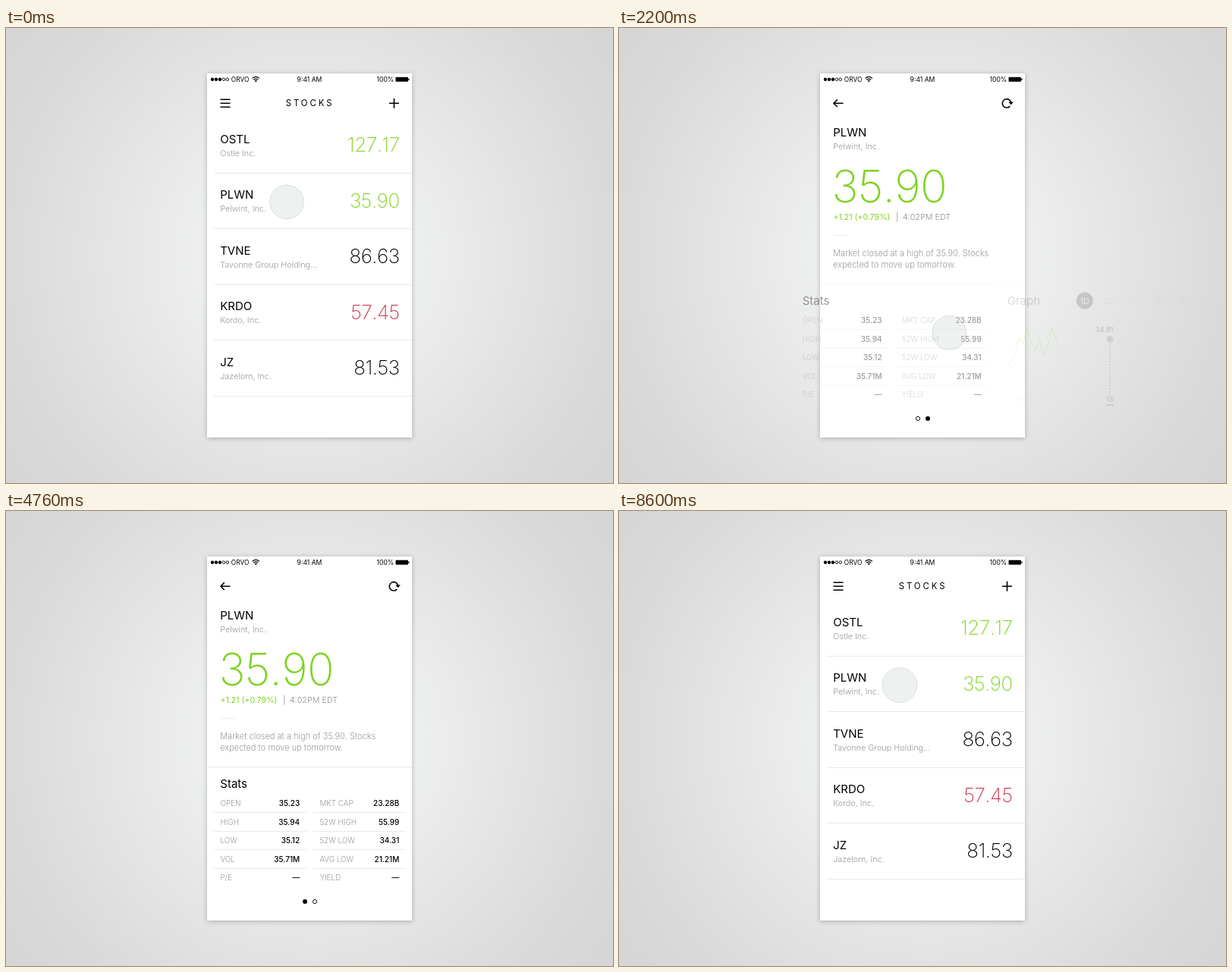
These frames come from a looping animation (800 px wide and 600 px high, 8640 ms). An HTML page:

```html
<!DOCTYPE html>
<html lang="en">
<head>
<meta charset="utf-8">
<title>Stocks</title>
<style>
html, body { margin: 0; width: 100%; height: 100%; overflow: hidden; }
body { background: radial-gradient(circle at 400px 300px, #f5f7f6 0, #eceeed 160px, #e4e5e4 260px, #d9d9d9 410px, #d5d5d5 500px); }
svg { display: block; width: 800px; height: 600px; }
text { font-family: Inter, Roboto, sans-serif; white-space: pre; }
.price { font-kerning: none; }
.sheet { fill: #fff; filter: drop-shadow(0 1px 3px rgba(0, 0, 0, calc(.25 * var(--shade, 1)))); }
</style>
</head>
<body>
<svg viewBox="0 0 800 600">
  <g id="list"></g>
  <g id="detail"><g id="stats"></g><g id="graph"></g></g>
  <circle id="touch" fill="rgba(190,203,198,.27)" stroke="rgba(120,130,125,.2)"/>
</svg>
<script>
const $ = id => document.getElementById(id);
const GREEN = '#7ed321', RED = '#d0324f', GRAY = '#999', RULE = '#e9e9e9';

// Drawing helpers that return SVG markup
const text = (x, y, str, size, {fill = '#000', weight = 400, anchor = 'start', gap = 0, kind = ''} = {}) =>
  `<text class="${kind}" x="${x}" y="${y}" font-size="${size}" fill="${fill}" font-weight="${weight}" text-anchor="${anchor}" letter-spacing="${gap}">${str}</text>`;
const path = (d, width = 1, color = '#000', extra = '') =>
  `<path d="${d}" fill="none" stroke="${color}" stroke-width="${width}" ${extra}/>`;
const rule = (x1, x2, y) => path(`M${x1} ${y}H${x2}`, 1, RULE);
const dot = (x, y, r, filled) =>
  `<circle cx="${x}" cy="${y}" r="${filled ? r : r - .4}" fill="${filled ? '#000' : 'none'}" stroke="#000" stroke-width="${filled ? 0 : .9}"/>`;

const sheet = () => '<rect class="sheet" x="265" y="60" width="270" height="480"/>' +
  [0, 1, 2, 3, 4].map(i => dot(272 + i * 4.95, 67.7, 2.2, i < 3)).join('') +
  text(296.8, 70.9, 'ORVO', 8.4) +
  path('M324.6 66.4Q329.3 62.4 334 66.4M326.3 68.3Q329.3 65.8 332.3 68.3', 1.2) +
  '<path d="M327.6 69.4Q329.3 68.2 331 69.4L329.3 71.2Z"/>' +
  text(400, 70.9, '9:41 AM', 8.6, {anchor: 'middle'}) +
  text(511.3, 70.9, '100%', 8.6, {anchor: 'end'}) +
  '<rect x="513.5" y="64.8" width="16.5" height="6" rx="1"/><rect x="530.3" y="66.6" width="1.2" height="2.4"/>';

const stocks = [
  ['OSTL', 'Ostle Inc.', '127.17', GREEN],
  ['PLWN', 'Pelwint, Inc.', '35.90', GREEN],
  ['TVNE', 'Tavonne Group Holding...', '86.63', '#000'],
  ['KRDO', 'Kordo, Inc.', '57.45', RED],
  ['JZ', 'Jazelorn, Inc.', '81.53', '#000']
];

$('list').innerHTML = sheet() +
  path('M282.5 94.2H295.5M282.5 99.2H295.5M282.5 104.2H295.5', 1.5) +
  path('M505 99.2H518M511.5 92.7V105.7', 1.6) +
  text(368.8, 103.2, 'STOCKS', 11.4, {gap: 2.9}) +
  stocks.map(([code, name, price, fill], i) => {
    const y = i * 73.5;
    return text(282.2, 151.5 + y, code, 15) +
      text(282.2, 168.7 + y, name, 10.8, {fill: GRAY, weight: 300}) +
      text(518.6, 163.4 + y, price, 26, {fill, weight: 200, anchor: 'end', gap: -.5, kind: 'price'}) +
      rule(274, 535, Math.floor(191 + y) + .5);
  }).join('');

const [code, name, price] = stocks[1];
$('detail').insertAdjacentHTML('afterbegin', sheet() +
  path('M283 99.2H295.5M287.8 94.4L283 99.2L287.8 104', 1.6) +
  path('M515.3 103.1A5.7 5.7 0 1 1 516.6 98', 1.6) +
  '<path d="M513.3 97.4H519.8L516.8 101.2Z"/>' +
  text(282.2, 142.5, code, 15) +
  text(282.2, 160, name, 10.8, {fill: GRAY, weight: 300}) +
  text(280.6, 229.6, price, 59, {fill: GREEN, weight: 150, gap: -.7, kind: 'price'}) +
  text(282.4, 252.7, '+1.21 (+0.79%)', 10.6, {fill: GREEN}) +
  text(365, 252.7, '|', 10.6, {fill: GRAY}) +
  text(373.8, 252.7, '4:02PM EDT', 10.8, {fill: '#8c8c8c', weight: 300}) +
  rule(283, 301, 273.5) +
  text(282.2, 300.8, `Market closed at a high of ${price}. Stocks`, 11, {fill: GRAY, weight: 300}) +
  text(282.2, 316.2, 'expected to move up tomorrow.', 11, {fill: GRAY, weight: 300}) +
  '<g id="dots"></g>');

const columns = [
  [282.4, 387.2, 'OPEN 35.23,HIGH 35.94,LOW 35.12,VOL 35.71M,P/E —'],
  [413.4, 518.3, 'MKT CAP 23.28B,52W HIGH 55.99,52W LOW 34.31,AVG LOW 21.21M,YIELD —']
];
$('stats').innerHTML = rule(265, 535, 338) + text(282.3, 364.9, 'Stats', 15) +
  columns.map(([left, right, rows]) => rows.split(',').map((row, i) => {
    const y = 389.2 + i * 24.5, cut = row.lastIndexOf(' ');
    return text(left, y, row.slice(0, cut), 9.9, {fill: GRAY, weight: 300}) +
      text(right, y, row.slice(cut + 1), 10, {weight: 500, anchor: 'end'}) +
      (i < 4 ? rule(left - 8.4, right + 8.5, Math.floor(397.6 + i * 24.5) + .5) : '');
  }).join('')).join('');

const series = [446, 439, 431, 409, 416, 395, 416, 424, 410, 431, 422, 395, 410, 429, 438,
  460, 452, 430, 438, 416, 427, 423, 412, 417, 409, 410, 408, 411, 395, 400, 399, 423, 416,
  434, 438, 460, 444, 417, 427, 423, 402, 411, 413, 416, 402];
const tabs = [['1D', 384.4], ['3D', 416], ['1W', 449], ['1M', 481], ['1Y', 511.7]];
const days = [298, 339, 378.3, 417.6, 457.3, 501.5];
$('graph').innerHTML = rule(265, 535, 338) + text(282.3, 364.9, 'Graph', 15) +
  '<circle cx="384.4" cy="359.6" r="11"/>' +
  tabs.map(([label, x], i) => text(x, 363.5, label, 10.9,
    {fill: i ? '#aaa' : '#fff', weight: i ? 300 : 400, anchor: 'middle'})).join('') +
  rule(282, 518, 420.5) +
  path('M' + series.map((y, i) => `${(282 + i * 5.364).toFixed(1)} ${y}`).join('L'), 1.1, GREEN,
    'id="curve" pathLength="1"') +
  path('M417.6 415V484', 1, '#000', 'stroke-dasharray="2 2"') +
  '<circle cx="417.6" cy="410.2" r="3.8" fill="#fff" stroke="#000"/><circle cx="417.6" cy="410.2" r="2.2"/>' +
  text(410, 401.2, '34.81', 9, {weight: 600, anchor: 'middle'}) +
  days.map((x, i) => text(x, 493.2, 10 + i, 8.7,
    {fill: i === 3 ? '#000' : '#c4c4c4', weight: i === 3 ? 500 : 300, anchor: 'middle'})).join('') +
  path('M412.6 497.3H422.8', 1.4);

const LOOP = 8640, MOVE = 600;
const PUSH = 220, SWIPE = 2000, SWIPE_BACK = 4080, POP = 6337;

const clamp = (v, lo = 0, hi = 1) => Math.min(hi, Math.max(lo, v));
const ease = t => t < .5 ? 4 * t ** 3 : 1 - 4 * (1 - t) ** 3;
const step = (now, start) => clamp((now - start) / MOVE);
const place = (id, x, opacity) => {
  $(id).setAttribute('transform', `translate(${x.toFixed(2)} 0)`);
  $(id).setAttribute('opacity', opacity.toFixed(3));
};

// Touch marker: [start of the action, x, y, drag direction]
const touches = [[PUSH, 370, 229.5, 0], [SWIPE, 476, 402, -1], [SWIPE_BACK, 364, 402, 1], [POP, 292, 99, 0]];
function drawTouch(now) {
  let opacity = 0, x = 0, y = 0, r = 22.5;
  for (const [start, tx, ty, drag] of touches) {
    const u = (now - start + LOOP + 1000) % LOOP - 1000;
    const [from, shown, fade, gone] = drag ? [-140, -60, 240, 360] : [-320, -260, -80, 60];
    if (u < from || u > gone) continue;
    opacity = Math.min(clamp((u - from) / (shown - from)), clamp((gone - u) / (gone - fade)));
    x = tx + drag * 270 * ease(clamp(u / MOVE));
    y = ty;
    if (!drag) r = clamp(22.5 - (u + 220) / 80, 20, 24);
  }
  for (const [key, value] of Object.entries({cx: x, cy: y, r, opacity})) $('touch').setAttribute(key, value);
}

function draw(now) {
  const popping = now >= POP;
  const t = step(now, popping ? POP : PUSH);
  const offset = 270 * (popping ? ease(t) : 1 - ease(t));
  place('detail', offset, popping ? 1 - t ** 1.7 : clamp(t * 1.5));
  place('list', 0, popping ? clamp(t * 1.6) : 1 - t ** 2.5);
  $('detail').style.setProperty('--shade', 1 - offset / 270);

  const back = now >= SWIPE_BACK;
  const s = step(now, back ? SWIPE_BACK : SWIPE), shift = 270 * ease(s);
  const leave = clamp(1 - s / .55), enter = s ** 1.8;
  place('stats', back ? shift - 270 : -shift, back ? enter : leave);
  place('graph', back ? shift : 270 - shift, back ? leave : enter);
  // The curve is traced from the left while the graph arrives
  $('curve').setAttribute('stroke-dasharray', `${back ? 1 : s} 2`);

  const second = now >= SWIPE + 120 && now < SWIPE_BACK + 120;
  $('dots').innerHTML = dot(394, 515, 3, !second) + dot(407, 515, 3, second);
  drawTouch(now);
}

const begin = performance.now();
function frame() {
  draw((performance.now() - begin) % LOOP);
  requestAnimationFrame(frame);
}
frame();
</script>
</body>
</html>
```
